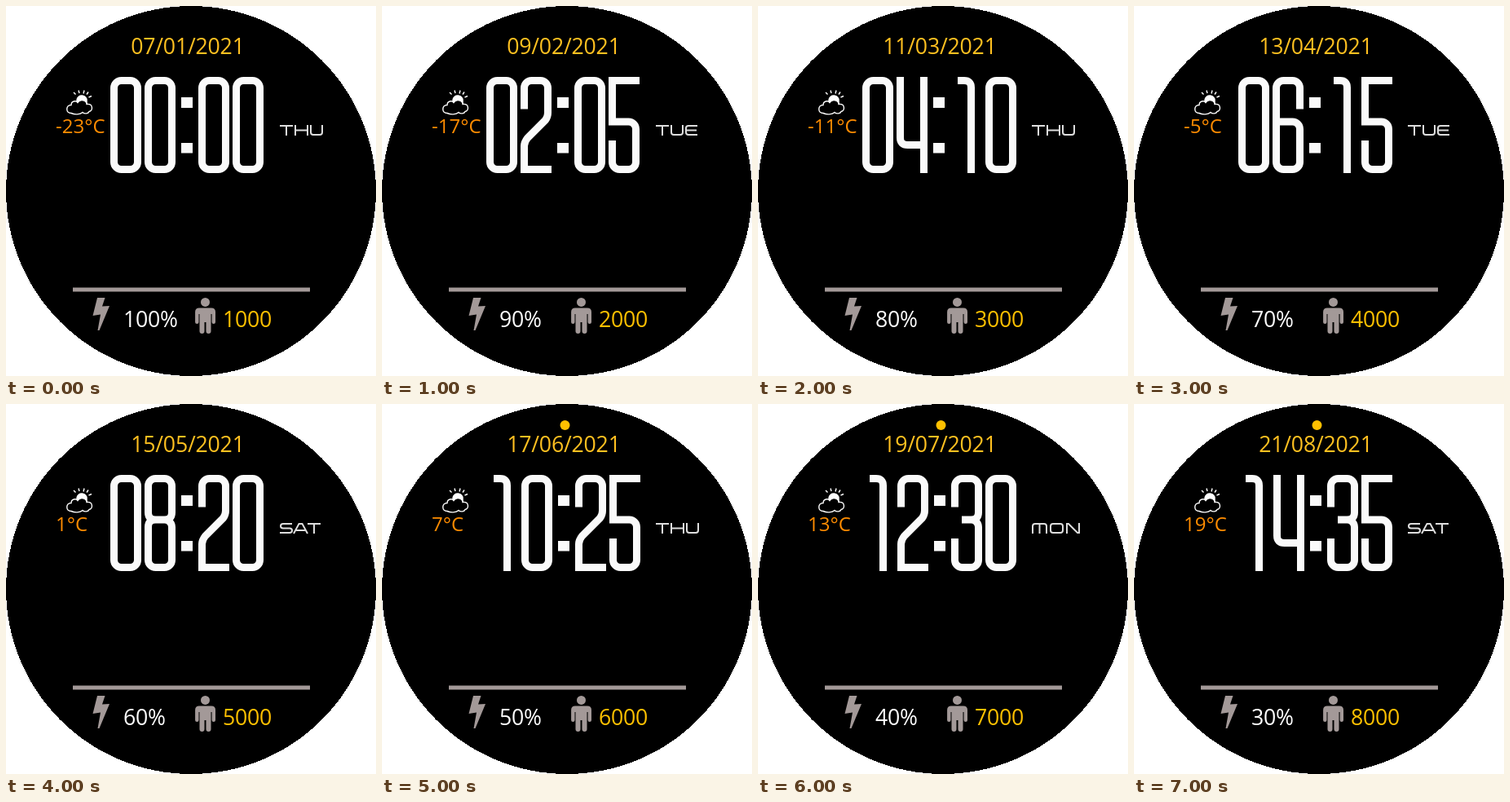
Animation, 454 px wide and 454 px high, one loop 8 s. Source, as an HTML page:

```html
<!DOCTYPE html>
<html lang="en">
<head>
<meta charset="utf-8">
<title>Watch face</title>
<style>
  html, body { margin: 0; width: 100%; height: 100%; overflow: hidden; background: #fff; }
  svg { display: block; width: 454px; height: 454px; }
  text { font: 26.67px "Open Sans", "Noto Sans", sans-serif; letter-spacing: -.2px; }
  #face { shape-rendering: crispEdges; }
  #date { fill: #ffc020; }
  #temp { fill: #ff8c00; font-size: 24px; letter-spacing: 0; }
  #charge { fill: #fff; }
  #steps { fill: #ffc000; }
  #link { fill: #ffc000; }
  #time { fill: none; stroke: #fafafa; stroke-width: 9; }
  #day { fill: none; stroke: #ddd; stroke-width: 2; }
  .grey { fill: #a39998; }
  .weather { fill: none; stroke: #fff; stroke-width: 1.4; }
</style>
</head>
<body>
<svg viewBox="0 0 454 454">
  <circle id="face" cx="227" cy="227" r="227"/>
  <circle id="link" cx="224.5" cy="26" r="6"/>
  <text id="date" x="153.2" y="59"/>

  <g class="weather">
    <path d="M87 115a6 5.500 0 0 1 12 1v4H87Z" fill="#fff"/>
    <path d="M80 131.500c-7 0-7-10 0-10c0-5 6-6 8-3c3-5 11-3 11 2c8-1 8 8 3 9c-1 3-6 3-8 1c-3 3-10 3-14 1Z" fill="#000"/>
    <path d="M83 106l2.500 2.500M89 103.500l1 3.500M96 103.500l-1 4M101 105.500l-2 3M105 110.500l-3.500 1.500"/>
  </g>
  <text id="temp" x="61" y="156"/>

  <g id="time"></g>
  <g id="day"></g>

  <g class="grey">
    <path d="M82 345.500H373V350.500H82Z"/>
    <path d="M112 358H121.500L118 368.500L127 368L114.500 398H112.500L116 378.500L106.500 380Z"/>
    <circle cx="244.500" cy="363.400" r="5.500"/>
    <path d="M237 370.500H252q5 0 5 5V388q0 2-2.200 2t-2.200-2V378H251.500V399q0 3-3 3t-3-3V388H243.500V399q0 3-3 3t-3-3V378H236.500V388q0 2-2.200 2t-2.200-2V375.500q0-5 5-5Z"/>
  </g>
  <text id="charge" x="144" y="394"/>
  <text id="steps" x="266" y="394"/>
</svg>

<script>
const el = id => document.getElementById(id);
const pad = n => String(n).padStart(2, "0");

// Stroked numerals in a 38 x 118 cell
const arch = "V13.5a9 9 0 0 1 9-9H24.5a9 9 0 0 1 9 9V";
const bowl = "a9 9 0 0 1 9 9V104.5a9 9 0 0 1-9 9H13.5a9 9 0 0 1-9-9V";
const numerals = {
  0: "M13.5 4.5H24.5" + bowl + "13.5a9 9 0 0 1 9-9Z",
  1: "M9 4.5H17q8.500 0 8.500 8.500V118",
  2: "M4.5 39.500" + arch + "44q0 5-3 9L8.500 75q-4 5-4 10V113.500H38",
  3: "M4.5 39.500" + arch + "46q0 9-9 9H13M24.5 55" + bowl + "78",
  4: "M4.5 0V74.500q0 9 9 9H38M33.5 0V118",
  5: "M38 4.5H4.5V55H24.5" + bowl + "78",
  6: "M33.5 39.500V13.5a9 9 0 0 0-9-9H13.5a9 9 0 0 0-9 9V104M4.5 55H24.5" + bowl + "55",
  8: "M4.5 46" + arch + "46q0 9-9 9H13.5q-9 0-9-9ZM24.5 55" + bowl + "64q0-9 9-9",
  ":": "M4.5 29.500H9.500V33.500H4.500ZM4.5 85.500H9.500V89H4.500Z"
};

// Wide capitals, 13 high: [path, advance]
const capitals = {
  A: ["M0 13L6.500 1H10.500L17 13M3 9H14", 17],
  E: ["M15 1H4q-3 0-3 3V9q0 3 3 3H15M1 6.500H14", 18],
  H: ["M1 0V13M16 0V13M1 6.500H16", 19],
  M: ["M1 13V4q0-3 3-3H15q3 0 3 3V13M9.500 1V13", 22],
  N: ["M1 13V1H3L14 12H16V0", 19],
  O: ["M4 1H13q3 0 3 3V9q0 3-3 3H4q-3 0-3-3V4q0-3 3-3Z", 20],
  S: ["M15 1H4q-3 0-3 2.750T4 6.500H12q3 0 3 2.750T12 12H0", 17],
  T: ["M0 1H16M8 1V13", 18],
  U: ["M1 0V9q0 3 3 3H12q3 0 3-3V0", 18]
};

const glyph = (d, x, y) => `<path transform="translate(${x} ${y})" d="${d}"/>`;

function drawTime(text) {
  let x = 128, out = "";
  for (const c of text) {
    if (c === ":") x += 3;
    out += glyph(numerals[c], x, 87);
    x += c === ":" ? 21 : c === "1" ? 43 : 42;
  }
  el("time").innerHTML = out;
}

function drawDay(text) {
  let x = 336, out = "";
  for (const c of text) {
    const [d, advance] = capitals[c];
    out += glyph(d, x, 146);
    x += advance;
  }
  el("day").innerHTML = out;
}

const days = ["SUN", "MON", "TUE", "WED", "THU", "FRI", "SAT"];

function show(i) {
  const date = 7 + 2 * i;
  el("date").textContent = `${pad(date)}/${pad(i + 1)}/2021`;
  el("temp").textContent = `${6 * i - 23}°C`;
  el("charge").textContent = `${100 - 10 * i}%`;
  el("steps").textContent = 1000 * (i + 1);
  el("link").style.display = i < 5 ? "none" : "";
  drawTime(`${pad(2 * i)}:${pad(5 * i)}`);
  drawDay(days[new Date(2021, i, date).getDay()]);
}

let shown = -1;
const start = performance.now();
function tick() {
  const i = Math.floor((performance.now() - start) / 1000) % 8;
  if (i !== shown) show(shown = i);
  requestAnimationFrame(tick);
}
tick();
</script>
</body>
</html>
```
